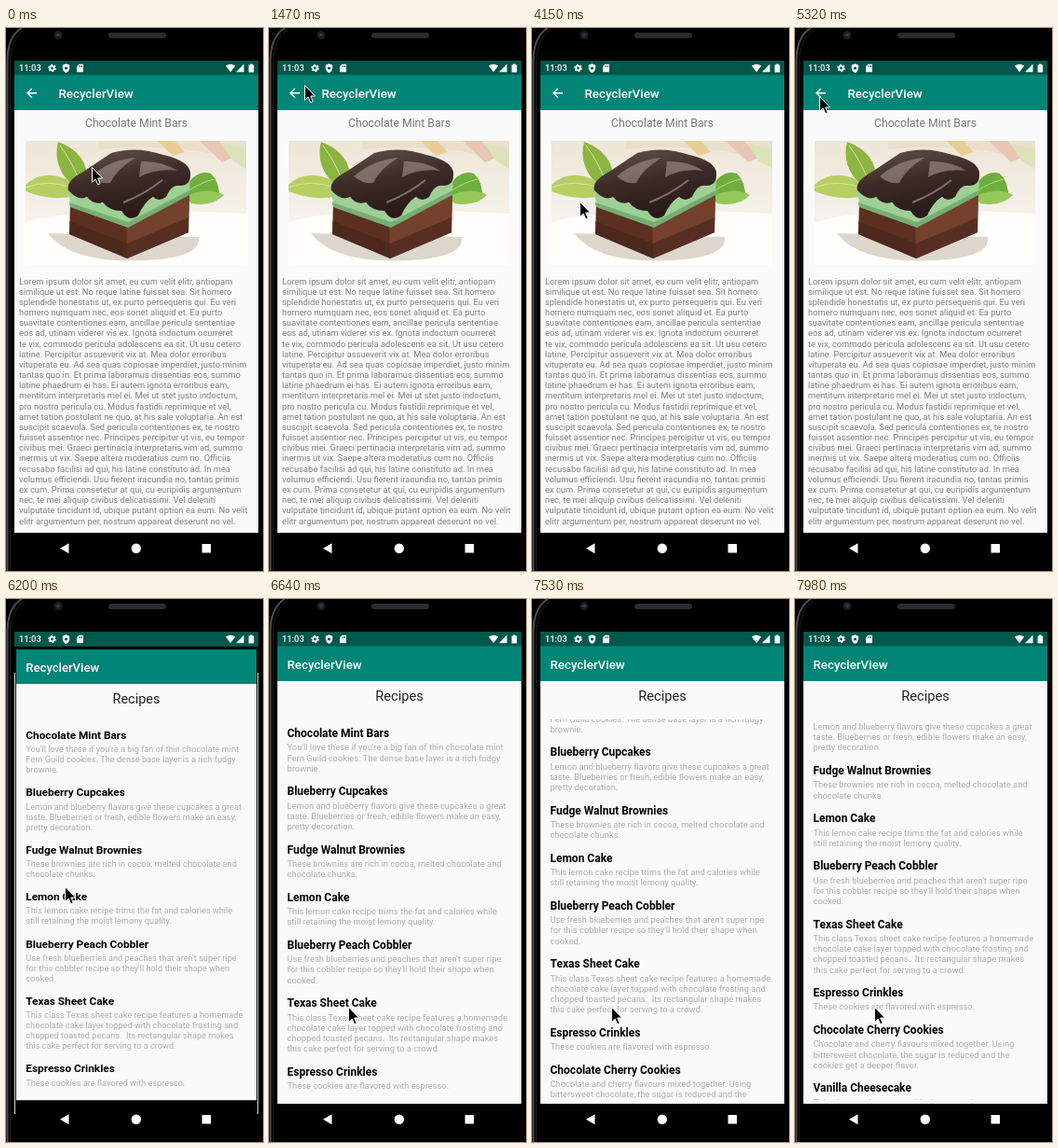
Animation, 276 px wide and 582 px high, one loop 8000 ms. Source, as an HTML page:

```html
<!DOCTYPE html>
<html lang="en">
<head>
<meta charset="utf-8">
<title>Recipes</title>
<style>
html, body { margin: 0; width: 100%; height: 100%; overflow: hidden; background: #000; }
svg { display: block; width: 276px; height: 582px; }
text { font-family: Roboto, sans-serif; white-space: pre; }
.bar { font-size: 13.34px; font-weight: 500; fill: #fff; }
.head { font-size: 14.67px; fill: #222; text-anchor: middle; }
.name { font-size: 12px; font-weight: 700; fill: #000; }
.note { font-size: 9.34px; fill: #adadad; }
.dish { font-size: 12.2px; fill: #777; text-anchor: middle; }
.body { font-size: 9.34px; fill: #808080; }
.clock { font-size: 9.34px; font-weight: 500; fill: #fff; }
</style>
</head>
<body>
<svg viewBox="0 0 276 582">
  <defs>
    <clipPath id="rows"><rect x="9" y="129" width="262" height="408"/></clipPath>
    <clipPath id="photo"><rect x="21" y="121" width="237" height="133"/></clipPath>
    <clipPath id="screen"><rect x="9" y="35" width="262" height="541"/></clipPath>
    <linearGradient id="table" x2="0" y2="1">
      <stop offset="0" stop-color="#eee6d6"/><stop offset=".5" stop-color="#f4f0e8"/><stop offset="1" stop-color="#fbfaf6"/>
    </linearGradient>
    <linearGradient id="glaze" x2=".3" y2="1">
      <stop offset="0" stop-color="#65534d"/><stop offset=".5" stop-color="#3d2b27"/><stop offset="1" stop-color="#291a18"/>
    </linearGradient>
  </defs>

  <!-- phone -->
  <rect width="276" height="582"/>
  <path d="M1.5 582V34Q2 9 17 0" fill="none" stroke="#4b4d52" stroke-width="2"/>
  <path d="M4.5 582V36Q5 12 20 2" fill="none" stroke="#1b1c1f"/>
  <rect x="110" y="5" width="62" height="6" rx="3" fill="#2b2b2d"/>
  <circle cx="56" cy="7.5" r="4.5" fill="#1d1e22"/>
  <circle cx="56" cy="7.5" r="2" fill="#34394a"/>

  <g clip-path="url(#screen)">
    <rect x="9" y="35" width="262" height="16" fill="#00574b"/>
    <path id="edges" d="M9.5 79V552M270.5 79V552" stroke="#d8d8d8" opacity="0"/>

    <g id="list">
      <rect x="9" y="50.5" width="262" height="38" fill="#008577"/>
      <rect x="9" y="88" width="262" height="453" fill="#fafafa"/>
      <text class="bar" x="19.5" y="74.8">RecyclerView</text>
      <text class="head" x="140" y="109.2">Recipes</text>
      <g clip-path="url(#rows)"><g id="items"></g></g>
    </g>

    <g id="detail">
      <rect x="9" y="50.5" width="262" height="38" fill="#008577"/>
      <rect x="9" y="88" width="262" height="453" fill="#fafafa"/>
      <circle id="ripple" cx="27.5" cy="70" r="13.5" fill="#fff" opacity="0"/>
      <path d="M33 69.8H23.2M27.8 65L23 69.8L27.8 74.6" fill="none" stroke="#fff" stroke-width="1.4"/>
      <text class="bar" x="56.5" y="74.8">RecyclerView</text>
      <text class="dish" x="140" y="106.3">Chocolate Mint Bars</text>
      <g clip-path="url(#photo)">
        <rect x="21" y="121" width="237" height="133" fill="url(#table)"/>
        <path d="M100 121H258V146Q200 122 100 130Z" fill="#e9dfcb"/>
        <path d="M163 121L181 121L192 133L179 137Z" fill="#e8cd95"/>
        <path d="M208 121L228 121L243 139L232 144Z" fill="#e9c5b3"/>
        <path d="M232 124L258 130V151L244 143Z" fill="#dce3bb"/>
        <path d="M21 209Q70 190 258 199V254H21Z" fill="#fffefa"/>
        <path d="M45 220Q70 253 150 249Q210 246 207 224Z" fill="#ddd6cc"/>
        <path d="M21 168Q39 151 65 162Q87 164 89 174Q58 190 21 175Z" fill="#b5cf63"/>
        <path d="M56 122Q88 134 87 163Q74 174 62 158Q51 141 56 122Z" fill="#8cb440"/>
        <path d="M21 171Q46 161 73 172M58 126Q70 142 79 164" fill="none" stroke="#dbe6a0"/>
        <path d="M191 174Q203 151 220 156Q230 165 229 183Q207 190 191 174Z" fill="#6fae3c"/>
        <path d="M192 181Q217 169 234 179Q222 192 199 188Z" fill="#94c858"/>
        <path d="M195 175Q210 165 224 162" fill="none" stroke="#b6d987"/>
        <path d="M69 187L129 204L197 171L196 219L130 247L68 221Z" fill="#5b3021"/>
        <path d="M129 204L197 171L196 219L130 247Z" fill="#74412d"/>
        <path d="M68 207L130 231L196 203V219L130 247L68 221Z" fill="#41221a" opacity=".55"/>
        <path d="M67 174L129 198L198 160L197 178L131 213L69 190Z" fill="#9ed095"/>
        <path d="M68 187L131 208L197 174V179L131 214L69 192Z" fill="#76ae72"/>
        <path d="M67 174Q64 164 83 154L113 134Q140 126 169 136Q199 143 198 157Q198 169 187 169Q178 167 172 181Q164 187 158 181Q148 187 142 201Q132 209 124 196Q111 196 104 187Q94 190 87 181Q78 186 67 174Z" fill="url(#glaze)"/>
        <path d="M91 159Q112 141 139 139Q119 151 112 166Q102 168 91 159ZM145 143Q167 142 184 153Q161 150 143 160Z" fill="#a3958d" opacity=".6"/>
        <path d="M126 187Q149 178 168 163" fill="none" stroke="#826e66" stroke-width="2"/>
      </g>
      <g id="story"></g>
    </g>

    <!-- system bars -->
    <text class="clock" x="14" y="46.4">11:03</text>
    <g fill="#fff">
      <circle cx="49.5" cy="43" r="3.2"/>
      <circle cx="49.5" cy="43" r="3.7" fill="none" stroke="#fff" stroke-width="1.2" stroke-dasharray="1.94 1.94"/>
      <circle cx="49.5" cy="43" r="1.4" fill="#00574b"/>
      <path d="M64.5 38.2L68.2 39.8V43Q68 46.6 64.5 48Q61 46.6 60.8 43V39.8Z"/>
      <circle cx="64.5" cy="43" r="1.6" fill="#00574b"/>
      <path d="M78.5 38.7H83V47.3H76V41.2Z"/>
      <path d="M78.7 40V42M80.2 40V42M81.7 40V42" stroke="#00574b" stroke-width=".7"/>
      <path d="M236 40.6Q241 36.8 246.2 40.6L241.1 47.2Z"/>
      <path d="M255.5 38.6V47.2H247Z"/>
      <path d="M260.6 39.6H262.2V38.5H264.6V39.6H266.2V47.4H260.6Z"/>
      <path d="M67.5 552.3V563.2L58 557.8Z"/>
      <circle cx="139.8" cy="557.7" r="5.2"/>
      <rect x="210.5" y="553" width="9.5" height="9.5" rx=".6"/>
    </g>
  </g>

  <path id="mouse" d="M.5 .5V16.4L4.2 13L6.7 18.8L9.2 17.7L6.7 12H11.6Z" stroke="#fff" stroke-width="1"/>
</svg>

<script>
const LOOP = 8000, LINE = 11.17;
const $ = id => document.getElementById(id);

function write(parent, cls, x, y, str) {
  const el = document.createElementNS("http://www.w3.org/2000/svg", "text");
  el.setAttribute("class", cls);
  el.setAttribute("x", x);
  el.setAttribute("y", y.toFixed(2));
  el.textContent = str;
  parent.append(el);
}

const storyText = `Lorem ipsum dolor sit amet, eu cum velit elitr, antiopam
similique ut est. No reque latine fuisset sea. Sit homero
splendide honestatis ut, ex purto persequeris qui. Eu veri
homero numquam nec, eos sonet aliquid et. Ea purto
suavitate contentiones eam, ancillae pericula sententiae
eos ad, utinam viderer vis ex. Ignota indoctum ocurreret
te vix, commodo pericula adolescens ea sit. Ut usu cetero
latine. Percipitur assueverit vix at. Mea dolor erroribus
vituperata eu. Ad sea quas copiosae imperdiet, justo minim
tantas quo in. Et prima laboramus dissentias eos, summo
latine phaedrum ei has. Ei autem ignota erroribus eam,
mentitum interpretaris mel ei. Mei ut stet justo indoctum,
pro nostro pericula cu. Modus fastidii reprimique et vel,
amet tation postulant ne quo, at his sale voluptaria. An est
suscipit scaevola. Sed pericula contentiones ex, te nostro
fuisset assentior nec. Principes percipitur ut vis, eu tempor
civibus mei. Graeci pertinacia interpretaris vim ad, summo
inermis ut vix. Saepe altera moderatius cum no. Officiis
recusabo facilisi ad qui, his latine constituto ad. In mea
volumus efficiendi. Usu fierent iracundia no, tantas primis
ex cum. Prima consetetur at qui, cu euripidis argumentum
nec, te mei aliquip civibus delicatissimi. Vel deleniti
vulputate tincidunt id, ubique putant option ea eum. No velit
elitr argumentum per, nostrum appareat deserunt no vel.`;

const recipes = `Chocolate Mint Bars
You'll love these if you're a big fan of thin chocolate mint
Fern Guild cookies. The dense base layer is a rich fudgy
brownie.

Blueberry Cupcakes
Lemon and blueberry flavors give these cupcakes a great
taste. Blueberries or fresh, edible flowers make an easy,
pretty decoration.

Fudge Walnut Brownies
These brownies are rich in cocoa, melted chocolate and
chocolate chunks.

Lemon Cake
This lemon cake recipe trims the fat and calories while
still retaining the moist lemony quality.

Blueberry Peach Cobbler
Use fresh blueberries and peaches that aren't super ripe
for this cobbler recipe so they'll hold their shape when
cooked.

Texas Sheet Cake
This class Texas sheet cake recipe features a homemade
chocolate cake layer topped with chocolate frosting and
chopped toasted pecans.  Its rectangular shape makes
this cake perfect for serving to a crowd.

Espresso Crinkles
These cookies are flavored with espresso.

Chocolate Cherry Cookies
Chocolate and cherry flavours mixed together. Using
bittersweet chocolate, the sugar is reduced and the
cookies get a deeper flavor.

Vanilla Cheesecake
This cheesecake comes with cherry toppings.`;

storyText.split("\n").forEach((line, i) => write($("story"), "body", 14, 274.6 + i * LINE, line));

let rowY = 148;
for (const recipe of recipes.split("\n\n")) {
  const [title, ...notes] = recipe.split("\n");
  write($("items"), "name", 19.5, rowY, title);
  notes.forEach((line, i) => write($("items"), "note", 19.5, rowY + 14.4 + i * LINE, line));
  rowY += 28.8 + notes.length * LINE;
}

// Each row: time in ms, then the values held from that time on.
const mousePath = [
  [0, 92, 149], [140, 87, 128], [290, 74, 92], [430, 58, 54], [580, 42, 26],
  [730, 31, 36], [880, 31, 52], [1030, 36, 60], [1180, 38, 62], [1470, 38, 61],
  [1770, 37, 60], [1910, 36, 60],
  [2360, 23, 69], [2510, 33, 130], [2660, 52, 232], [2810, 62, 287],
  [3860, 61, 276], [4010, 57, 238], [4150, 51, 186], [4300, 43, 136],
  [4440, 35, 102], [4590, 28, 81], [4730, 26, 73],
  [5910, 30, 92], [6050, 50, 220], [6200, 63, 308],
  [6350, 68, 342], [6490, 79, 405], [6640, 85, 437]
];
const rippleSteps = [[0, 0], [5470, .1], [5620, .18], [5760, .14], [5910, .06]];
const fadeSteps = [[0, 1], [6050, .5], [6200, 0]];
const zoomSteps = [[0, 1], [6200, .985], [6350, 1]];
const scrollSteps = [[0, 0], [7090, 13], [7230, 28], [7380, 37], [7530, 42], [7830, 63], [7980, 84.6]];

const at = (steps, t) => steps.findLast(step => step[0] <= t).slice(1);

function draw(t) {
  const [x, y] = at(mousePath, t), [zoom] = at(zoomSteps, t), [shift] = at(scrollSteps, t);
  $("mouse").setAttribute("transform", `translate(${x} ${y})`);
  $("list").setAttribute("transform", `translate(140 288) scale(${zoom}) translate(-140 -288)`);
  $("items").setAttribute("transform", `translate(0 ${-shift})`);
  $("detail").setAttribute("opacity", at(fadeSteps, t)[0]);
  $("ripple").setAttribute("opacity", at(rippleSteps, t)[0]);
  $("edges").setAttribute("opacity", zoom < 1 ? 1 : 0);
}

const start = performance.now();
function tick() {
  draw(Math.max(0, performance.now() - start) % LOOP);
  requestAnimationFrame(tick);
}
tick();
</script>
</body>
</html>
```
